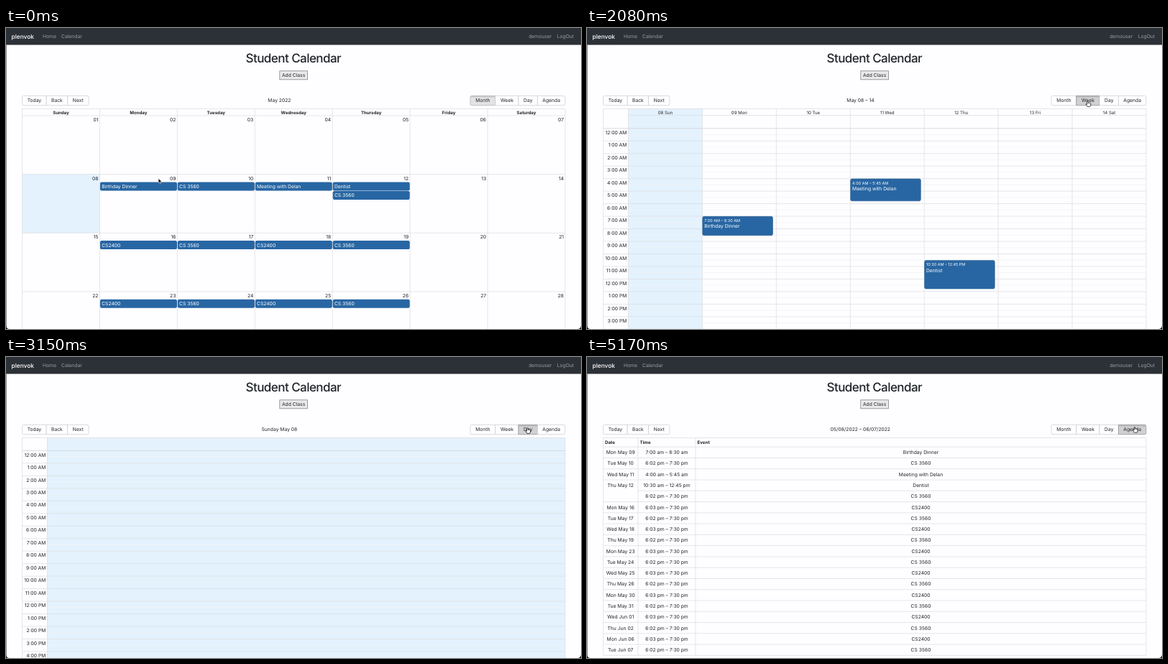
These frames come from a looping animation (800 px wide and 419 px high, 5490 ms). An HTML page:

```html
<!DOCTYPE html>
<html lang="en">
<head>
<meta charset="utf-8">
<title>Student Calendar</title>
<style>
  html, body { margin: 0; width: 100%; height: 100%; overflow: hidden; background: #fefdff; }
  svg { display: block; width: 100%; height: 100%; }
  text { font-family: Inter, Roboto, "Liberation Sans", sans-serif; font-size: 6.75px; fill: #212529;
         text-rendering: geometricPrecision; white-space: pre; }
</style>
</head>
<body>
<svg id="stage" viewBox="0 0 800 419">
  <defs>
    <linearGradient id="inset" x1="0" y1="0" x2="0" y2="1">
      <stop offset="0" stop-opacity=".14"/>
      <stop offset="1" stop-opacity="0"/>
    </linearGradient>
  </defs>
</svg>
<script>
const LOOP = 5490;
const LEFT = 22.5, RIGHT = 778, TOP = 112.5, GUTTER = 57.5, BOTTOM = 419;
const HOUR = 17.47;
const GRID = '#dcdcde', PAPER = '#fefdff', TODAY = '#e3f2fd', EVENT = '#2866a3';
const DAYS = ['Sunday', 'Monday', 'Tuesday', 'Wednesday', 'Thursday', 'Friday', 'Saturday'];
const stage = document.getElementById('stage');

function add(parent, tag, attrs, content) {
  const node = document.createElementNS('http://www.w3.org/2000/svg', tag);
  for (const key in attrs) node.setAttribute(key, attrs[key]);
  if (content !== undefined) node.textContent = content;
  parent.appendChild(node);
  return node;
}
const rect = (parent, x, y, x2, y2, fill, more) =>
  add(parent, 'rect', { x, y, width: x2 - x, height: y2 - y, fill, ...more });
const line = (parent, x1, y1, x2, y2, stroke = GRID, width = 0.7) =>
  add(parent, 'line', { x1, y1, x2, y2, stroke, 'stroke-width': width });
const label = (parent, str, x, y, anchor = 'start', more) =>
  add(parent, 'text', { x, y, 'text-anchor': anchor, ...more }, str);
const pad = n => String(n).padStart(2, '0');

// Events of one day, counted from May 1; each is [title, start and end].
function eventsOn(day) {
  const special = {
    9: ['Birthday Dinner', '7:00 am – 8:30 am'],
    11: ['Meeting with Delan', '4:00 am – 5:45 am'],
    12: ['Dentist', '10:30 am – 12:45 pm']
  }[day];
  const list = special ? [special] : [];
  const weekday = (day - 1) % 7;
  if (day > 9 && (weekday === 2 || weekday === 4)) list.push(['CS 3560', '6:02 pm – 7:30 pm']);
  if (day > 14 && (weekday === 1 || weekday === 3)) list.push(['CS2400', '6:03 pm – 7:30 pm']);
  return list;
}

function drawPage() {
  rect(stage, 0, 0, 800, 419, PAPER);
  rect(stage, 0, 0, 800, 23.5, '#2c3137');
  label(stage, 'plenvok', 7.5, 14.6, 'start', { style: 'font-size:8.4px;fill:#fff;font-weight:500' });
  const nav = { style: 'fill:#9a9da1' };
  label(stage, 'Home', 51, 14.2, 'start', nav);
  label(stage, 'Calendar', 77, 14.2, 'start', nav);
  label(stage, 'demouser', 759.3, 14.2, 'end', nav);
  label(stage, 'LogOut', 790, 14.2, 'end', nav);
  label(stage, 'Student Calendar', 399.8, 47.7, 'middle',
    { style: 'font-size:17px;font-weight:500;letter-spacing:-.032em' });
  rect(stage, 380.8, 59.8, 419.4, 71.8, '#e9e9eb', { stroke: '#858587', 'stroke-width': 0.8 });
  label(stage, 'Add Class', 400.1, 68.3, 'middle');
}

function drawMonth(view) {
  const colWidth = (RIGHT - LEFT) / 7, first = 122, rowHeight = 81.65;
  const rowTop = row => first + row * rowHeight;
  rect(view, LEFT, rowTop(1), LEFT + colWidth, rowTop(2), TODAY);
  for (let row = 0; row < 4; row++) line(view, LEFT, rowTop(row), RIGHT, rowTop(row));
  line(view, LEFT, TOP, RIGHT, TOP);
  for (let col = 0; col <= 7; col++) line(view, LEFT + col * colWidth, TOP, LEFT + col * colWidth, BOTTOM);
  DAYS.forEach((name, col) => label(view, name, LEFT + (col + 0.5) * colWidth, 119.5, 'middle',
    { style: 'font-size:6.1px;font-weight:700' }));
  for (let day = 1; day <= 28; day++) {
    const x = LEFT + (day - 1) % 7 * colWidth, y = rowTop(Math.floor((day - 1) / 7));
    label(view, pad(day), x + colWidth - 2, y + 8.1, 'end');
    eventsOn(day).forEach(([title], i) => {
      const top = y + 10.8 + i * 12.6;
      rect(view, x + 0.5, top, x + colWidth - 0.4, top + 12, EVENT, { rx: 2.2 });
      label(view, title, x + 2.7, top + 8.4, 'start', { style: 'fill:#fff' });
    });
  }
}

function drawHours(view, top, columns) {
  const colWidth = (RIGHT - GUTTER) / columns;
  rect(view, GUTTER, TOP, GUTTER + colWidth, BOTTOM, TODAY);
  for (let hour = 0; top + hour * HOUR < BOTTOM; hour++) {
    const y = top + hour * HOUR;
    line(view, GUTTER, y + HOUR / 2, RIGHT, y + HOUR / 2, '#f3f3f5');
    line(view, LEFT, y + HOUR, RIGHT, y + HOUR);
    label(view, `${hour % 12 || 12}:00 ${hour < 12 ? 'AM' : 'PM'}`, 55.4, y + 8.2, 'end');
  }
  line(view, LEFT, TOP, RIGHT, TOP);
  line(view, LEFT, top, RIGHT, top, '#d6d6d8', 0.9);
  line(view, LEFT, TOP, LEFT, BOTTOM);
  for (let col = 0; col <= columns; col++) line(view, GUTTER + col * colWidth, TOP, GUTTER + col * colWidth, BOTTOM);
  return colWidth;
}

function drawWeek(view) {
  const top = 139.8, colWidth = drawHours(view, top, 7);
  line(view, GUTTER, 121.6, RIGHT, 121.6);
  DAYS.forEach((name, col) => label(view, `${pad(8 + col)} ${name.slice(0, 3)}`,
    GUTTER + (col + 0.5) * colWidth, 119.5, 'middle', { style: 'font-size:6.1px' }));
  [[9, 7, 8.5], [11, 4, 5.75], [12, 10.5, 12.75]].forEach(([day, from, to]) => {
    const [title, time] = eventsOn(day)[0];
    const x = GUTTER + (day - 8) * colWidth + 0.3, y = top + from * HOUR;
    rect(view, x, y + 0.2, x + colWidth * 0.95, top + to * HOUR + 0.5, EVENT,
      { rx: 2.2, stroke: '#215789', 'stroke-width': 0.5 });
    label(view, time.replace(/am|pm/g, s => s.toUpperCase()), x + 2.5, y + 7.9, 'start',
      { style: 'fill:#fff;font-size:5.5px' });
    label(view, title, x + 2.5, y + 16.3, 'start', { style: 'fill:#fff' });
  });
}

function drawDay(view) {
  drawHours(view, 130.4, 1);
}

function drawAgenda(view) {
  const head = 125.2, rowHeight = 15.27, timeX = 71, eventX = 151;
  const bold = { style: 'font-size:6.2px;font-weight:700' };
  label(view, 'Date', 25, 120.8, 'start', bold);
  label(view, 'Time', 73.5, 120.8, 'start', bold);
  label(view, 'Event', 153.5, 120.8, 'start', bold);
  line(view, LEFT, TOP, RIGHT, TOP);
  let y = head;
  for (let day = 9; day <= 38; day++) {
    eventsOn(day).forEach(([title, time], i) => {
      line(view, i ? timeX : LEFT, y, RIGHT, y);
      const base = y + 10;
      const date = day > 31 ? `Jun ${pad(day - 31)}` : `May ${pad(day)}`;
      if (!i) label(view, `${DAYS[(day - 1) % 7].slice(0, 3)} ${date}`, 46.7, base, 'middle');
      label(view, time, 111, base, 'middle');
      label(view, title, 464.5, base, 'middle');
      y += rowHeight;
    });
  }
  line(view, LEFT, y, RIGHT, y);
  [LEFT, timeX, eventX, RIGHT].forEach(x => line(view, x, TOP, x, y));
}

function makeButton(name, x, x2, roundLeft, roundRight) {
  const y = 94.4, y2 = 107.7, l = roundLeft ? 2 : 0, r = roundRight ? 2 : 0;
  const d = `M${x + l} ${y}H${x2 - r}q${r} 0 ${r} ${r}V${y2 - r}q0 ${r} ${-r} ${r}H${x + l}` +
    `q${-l} 0 ${-l} ${-l}V${y + l}q0 ${-l} ${l} ${-l}z`;
  const face = add(stage, 'path', { d, fill: PAPER, stroke: '#ccccce', 'stroke-width': 0.7 });
  const shade = rect(stage, x + 0.4, y + 0.3, x2 - 0.4, y + 3.4, 'url(#inset)', { visibility: 'hidden' });
  label(stage, name, (x + x2) / 2, 103.3, 'middle');
  return { x, x2, face, shade };
}

function styleButton(button, hover, active) {
  const dark = hover && active;
  button.face.setAttribute('fill', dark ? '#d0d0d2' : hover || active ? '#e3e3e5' : PAPER);
  button.face.setAttribute('stroke', dark ? '#8c8c8e' : hover || active ? '#adadaf' : '#ccccce');
  button.shade.setAttribute('visibility', active ? 'visible' : 'hidden');
}

drawPage();
makeButton('Today', 22.6, 56.2, true, false);
makeButton('Back', 56.2, 85.6, false, false);
makeButton('Next', 85.6, 115, false, true);
const buttons = [
  makeButton('Month', 646, 680.8, true, false),
  makeButton('Week', 680.8, 713, false, false),
  makeButton('Day', 713, 739.5, false, false),
  makeButton('Agenda', 739.5, 777.8, false, true)
];
const heading = label(stage, '', 380.4, 103.3, 'middle');
const titles = ['May 2022', 'May 08 – 14', 'Sunday May 08', '05/08/2022 – 06/07/2022'];
const views = [drawMonth, drawWeek, drawDay, drawAgenda].map(draw => {
  const view = add(stage, 'g', {});
  draw(view);
  return view;
});

// Window edge and rounded bottom corners.
rect(stage, 0, 23.5, 0.8, 419, '#77787b');
add(stage, 'path', { d: 'M0 414q0 5 5 5H0zM800 414q0 5-5 5h5z', fill: '#000' });

const arrow = add(stage, 'path', {
  d: 'M0 0V6.3L1.5 5 2.5 7.2 3.5 6.8 2.5 4.6H4.5z',
  fill: '#000', stroke: '#fff', 'stroke-width': 0.5, 'stroke-linejoin': 'round'
});
const hand = add(stage, 'path', {
  d: 'M-.8 .5Q0-.4.7.5V2.8Q1.5 2.2 2 2.9 2.8 2.5 3.1 3.2 4.1 3 4.1 4V5.4Q4 6.6 3.3 7.8H-.5' +
     'Q-1.5 6.2-2.6 4.7-2.7 3.7-1.7 4L-.8 4.8z',
  fill: '#fff', stroke: '#000', 'stroke-width': 0.7, 'stroke-linejoin': 'round'
});

// Pointer stops: time, x, y.
const stops = [
  [0, 212, 209.5], [50, 218, 209.5], [590, 472, 191], [1170, 652, 119], [1600, 696.7, 101.6],
  [2450, 696.7, 101.6], [2990, 725.5, 98.5], [3300, 725.5, 98.5], [3730, 762, 97.4], [LOOP, 762, 97.4]
];
const switches = [0, 1970, 3150, 4050];
const presses = [[1810, 1970, 1], [3890, 4050, 3]];

function pointerAt(t) {
  const i = stops.findIndex(stop => t < stop[0]);
  const [t0, x0, y0] = stops[i - 1], [t1, x1, y1] = stops[i];
  let u = (t - t0) / (t1 - t0);
  if (t > 1600) u = u * u * (3 - 2 * u);
  return [x0 + (x1 - x0) * u, y0 + (y1 - y0) * u];
}

function render(t) {
  const current = switches.filter(start => t >= start).length - 1;
  views.forEach((view, i) => view.setAttribute('display', i === current ? 'inline' : 'none'));
  if (heading.textContent !== titles[current]) heading.textContent = titles[current];

  const [x, y] = pointerAt(t);
  const overBar = y > 94 && y < 108;
  let pointing = false;
  buttons.forEach((button, i) => {
    const hover = overBar && x >= button.x && x < button.x2;
    const pressed = presses.some(([from, to, index]) => index === i && t >= from && t < to);
    styleButton(button, hover, i === current || pressed);
    pointing = pointing || hover;
  });
  const move = `translate(${x.toFixed(2)} ${y.toFixed(2)})`;
  arrow.setAttribute('transform', move);
  hand.setAttribute('transform', move);
  arrow.setAttribute('display', pointing ? 'none' : 'inline');
  hand.setAttribute('display', pointing ? 'inline' : 'none');
}

const begin = performance.now();
function tick() {
  render((performance.now() - begin) % LOOP);
  requestAnimationFrame(tick);
}
render(0);
requestAnimationFrame(tick);
</script>
</body>
</html>
```
